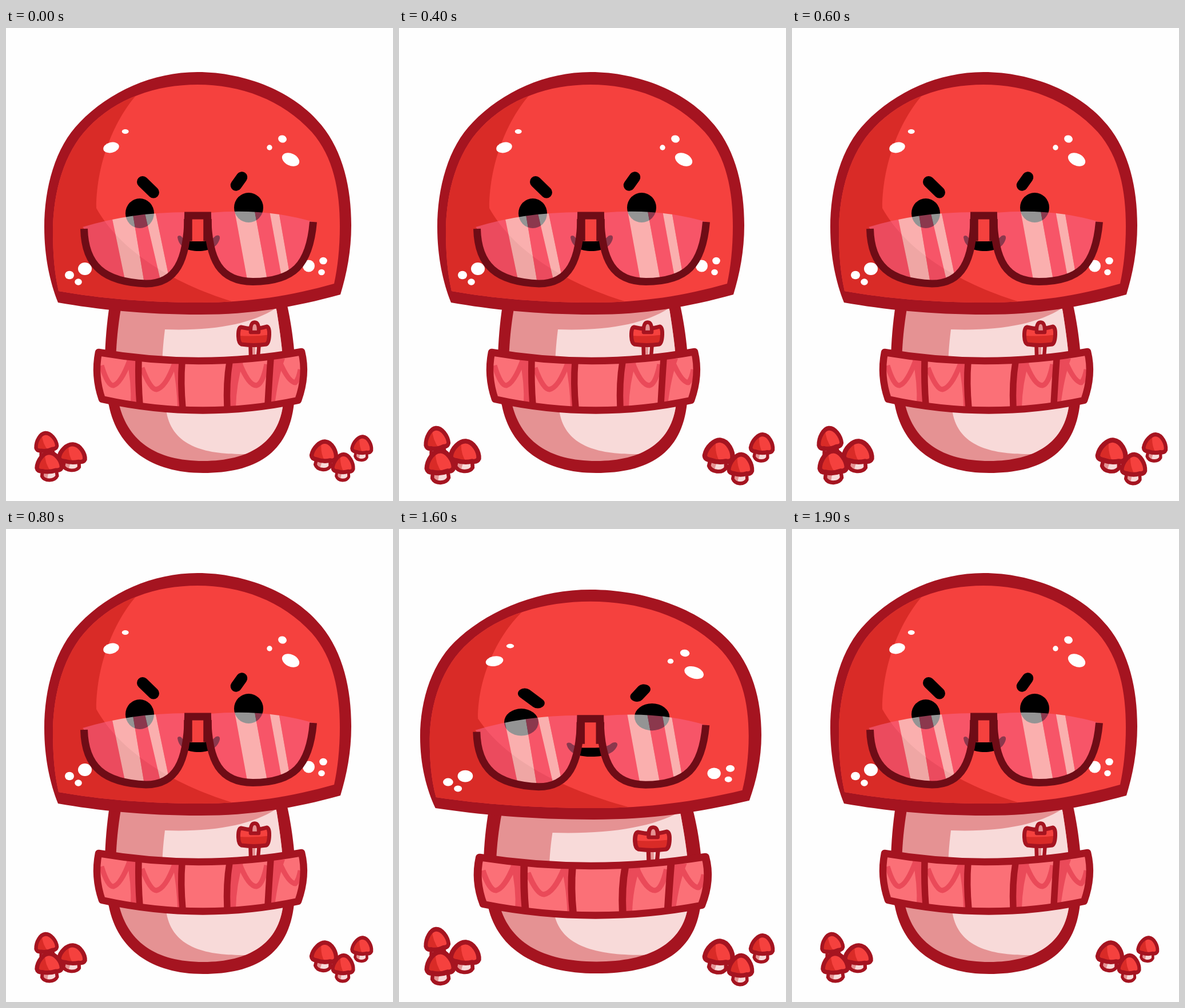
An HTML page with a canvas for the animation above (2.1 s loop, 677 by 827 pixels).

```html
<!DOCTYPE html>
<html lang="en">
<head>
<meta charset="utf-8">
<title>Bouncing mushroom</title>
<style>
html, body { margin: 0; width: 100%; height: 100%; overflow: hidden; background: #fefefe; }
canvas { display: block; }
</style>
</head>
<body>
<canvas id="stage" width="677" height="827"></canvas>
<script>
const ctx = document.getElementById('stage').getContext('2d');
const LINE = '#a51420', RED = '#f5413e', DARK = '#d92b27';
const LIGHT = '#f8dad9', SHADE = '#e59293', PINK = '#fb7077', FOLD = '#ea4a59';
const FRAME = '#6f0c16', LENS = 'rgba(250,101,138,.555)', GLARE = 'rgba(255,255,255,.58)';

// Each part: [scaleX, scaleY, moveX, moveY]
const still = [1, 1, 0, 0];
const poses = {
  rest: { cap: still, face: still, glasses: still, stem: still, scarf: still },
  tall: {
    cap: [.976, 1.042, 5.6, -32.3], face: [.947, 1.077, 17.9, -31],
    glasses: [1, 1, -.7, -8], stem: [.952, 1.035, 14.3, -27.2], scarf: [1, 1, -1, -1]
  },
  wide: {
    cap: [1.1117, .948, -37.5, 33], face: [1.2, .913, -66.8, 42],
    glasses: [1, 1, -.7, 3.7], stem: [1.147, .98, -50.4, 14.6], scarf: [1.1126, 1, -39.3, 7]
  }
};
const sprouts = {
  mid: { left: still, right: still },
  small: { left: [.863, .845, 10.6, 114.3], right: [.882, .938, 69.8, 46.1] },
  big: { left: [1.084, 1.155, -10, -118.3], right: [1.136, 1.123, -72.4, -91.6] }
};

const LOOP = 2100, STEP = 100;
const hop = ['tall', 'rest', 'wide', 'rest', 'tall'];
const hops = [
  { start: 300, sizes: ['mid', 'big', 'small', 'big', 'mid'] },
  { start: 1400, sizes: ['mid', 'small', 'big', 'small', 'mid'] }
];

const P = d => new Path2D(d);

function fill(path, color) {
  ctx.fillStyle = color;
  ctx.fill(path);
}

function stroke(path, color, width) {
  ctx.strokeStyle = color;
  ctx.lineWidth = width;
  ctx.stroke(path);
}

function group(draw, [sx, sy, x, y]) {
  ctx.save();
  ctx.transform(sx, 0, 0, sy, x, y);
  draw();
  ctx.restore();
}

function clipped(path, draw) {
  ctx.save();
  ctx.clip(path);
  draw();
  ctx.restore();
}

function spot(x, y, rx, ry, turn = 0, color = '#fff') {
  ctx.beginPath();
  ctx.ellipse(x, y, rx, ry, turn, 0, 7);
  ctx.fillStyle = color;
  ctx.fill();
}

const stemOuter = P('M181 485C172 545 169 620 180 660C195 735 255 778 345 778C435 778 495 745 504 655C511 600 502 530 492 485Z');
const stemInner = P('M202 485C193 535 188 600 196 650C210 722 262 757 345 757C425 757 478 725 485 655C490 600 480 535 472 485Z');
const stemLight = P('M278 527C365 530 430 517 472 490L500 560V745H420C350 746 292 732 281 673C272 640 270 590 278 527Z');

function drawStem() {
  fill(stemOuter, LINE);
  fill(stemInner, SHADE);
  clipped(stemInner, () => fill(stemLight, LIGHT));
}

const badge = P('M411 523Q434 529 456 522Q461 523 460.5 536Q460 551 455 553Q434 556 412 553Q407 551 406.5 539Q406 524 411 523Z');

function drawBadge() {
  fill(P('M427 556H443V576H427Z'), LIGHT);
  fill(P('M427 556H436V576H427Z'), SHADE);
  stroke(P('M427.5 556L428 574M442.5 556L441 574'), LINE, 6.5);
  fill(badge, RED);
  clipped(badge, () => fill(P('M400 537Q434 541 468 535V562H400Z'), DARK));
  stroke(badge, LINE, 7);
  const knob = P('M428 532Q427 514.5 435 514.5Q443 514.5 442 532Z');
  fill(knob, SHADE);
  stroke(knob, LINE, 6.5);
}

const scarf = P('M162 567Q340 597.5 517 566C523 590 522 620 511 651Q340 687 168 649C158 620 157 592 162 567Z');
const scallops = P('M167 590Q178 626 188 625Q201 621 216 582M238 594Q252 632 263 632Q279 629 295 586M408 584Q424 625 438 625Q449 623 456 588M478 582Q494 619 506 620Q512 614 515 597');
const pleats = P('M211 580H232V660H218Q220 620 211 580ZM291 584H308V664H300Q299 625 291 584ZM391 584H415Q403 620 402 664H387ZM463 578H488Q476 610 470 660H458Z');
const seams = P('M232 580Q231 620 234 658M308 584Q305 620 309 664M391 584Q385 620 387 664M463 578Q460 620 458 658');

function drawScarf() {
  fill(scarf, PINK);
  clipped(scarf, () => {
    fill(pleats, FOLD);
    stroke(scallops, FOLD, 9);
  });
  stroke(seams, LINE, 11.5);
  stroke(scarf, LINE, 12.5);
}

const capOuter = P('M91 480C77 445 67 400 67 348C67 280 86 208 129 165C181 111 257 77 335 77C420 77 505 112 552 170C590 217 604 280 604 345C604 390 596 430 585 466C505 488 430 501 340 501C240 501 160 492 91 480Z');
const capInner = P('M92 460C84 425 82 390 82 352C83 287 101 218 144 174C192 123 263 99 335 99C410 99 483 125 535 182C573 225 584 285 584 347C584 385 580 420 574 447C500 468 425 480 340 480C250 480 165 473 92 460Z');
const capShade = P('M235 110C195 150 158 230 158 315C200 390 290 445 395 478V490H60V110Z');

function drawCap() {
  fill(capOuter, LINE);
  fill(capInner, RED);
  clipped(capInner, () => fill(capShade, DARK));
  spot(184, 209, 14, 9, -.25);
  spot(208.7, 181, 6, 4);
  spot(483.5, 194, 7.5, 6.5, .3);
  spot(461, 209, 4.7, 4.7);
  spot(498, 230, 16, 10.5, .45);
  spot(111, 432, 8, 7.3);
  spot(126.5, 444, 6.3, 5.8);
  spot(138, 421, 12, 11);
  spot(529.5, 416, 10.5, 10.5);
  spot(555, 407, 6.8, 6.3);
  spot(552, 427, 5.8, 5.3);
}

function drawFace() {
  spot(234, 324, 25, 26, 0, '#000');
  spot(424.5, 314, 25.5, 26, 0, '#000');
  ctx.lineCap = 'round';
  stroke(P('M239 269L258 287.5'), '#000', 20);
  stroke(P('M412.5 261L402.5 275'), '#000', 19.5);
  ctx.lineCap = 'butt';
  fill(P('M300 366C300 362 306 362 308 366C318 374 325 373 337 373C350 373 358 372 365 365C369 361 375 362 374 368C370 384 355 390 337 390C318 390 303 384 300 366Z'), '#000');
}

const leftLens = P('M134 348Q220 322 316 322L318 330C318 385 312 418 292 436Q275 447 245 447C175 444 138 424 136 350Z');
const rightLens = P('M357 323Q455 314 541 340C536 385 525 420 500 434Q475 445 432 443C370 440 354 410 354 330Z');
const rims = P('M136.5 351C138 415 170 444 245 447C297 447 317 408 318.5 328H352.5C354 408 375 443 432 443.5C503 443 531 415 537.5 339');

// Edges run [xTop, xBottom] between y 320 and y 440, switching tint and glare.
function drawLens(lens, edges) {
  clipped(lens, () => {
    for (let i = 1; i < edges.length; i++) {
      const [a, b] = edges[i - 1], [c, d] = edges[i];
      fill(P(`M${a} 320L${b} 440L${b + (b - a) / 4} 470H${d + (d - c) / 4}L${d} 440L${c} 320L${c - (d - c) / 4} 290H${a - (b - a) / 4}Z`),
        i % 2 ? LENS : GLARE);
    }
  });
}

function drawGlasses() {
  drawLens(leftLens, [[100, 100], [183, 208], [221, 241], [242, 270], [261, 286], [340, 340]]);
  drawLens(rightLens, [[330, 330], [400, 422], [435, 457], [461, 483], [477, 498], [570, 570]]);
  ctx.lineJoin = 'miter';
  stroke(rims, FRAME, 13);
  stroke(P('M318.5 334V372M352.5 334V372'), FRAME, 14.5);
  ctx.lineJoin = 'round';
}

const sproutCap = P('M-22 9C-21 -4 -10 -17 0 -17C12 -17 22 -2 22 9Q20 15 12 14Q0 18 -12 15Q-21 15 -22 9Z');
const sproutFoot = P('M-12 12L-13.5 24Q-10 31 0 31Q10 31 13.5 24L12 12Z');

function sprout(x, y, sx, sy, turn) {
  ctx.save();
  ctx.translate(x, y);
  ctx.rotate(turn);
  ctx.scale(sx, sy);
  fill(sproutFoot, LIGHT);
  clipped(sproutFoot, () => fill(P('M-16 10H2Q-4 20 -4 32H-16Z'), SHADE));
  stroke(sproutFoot, LINE, 6);
  fill(sproutCap, RED);
  clipped(sproutCap, () => fill(P('M-7 -20Q-9 4 6 20H-30V-20Z'), DARK));
  stroke(sproutCap, LINE, 7.5);
  ctx.restore();
}

function drawLeftSprouts() {
  sprout(70, 724, .84, .93, -.1);
  sprout(116, 744, 1.03, .95, .08);
  sprout(75.5, 759.5, .99, 1, -.03);
}

function drawRightSprouts() {
  sprout(557, 740.5, .98, 1.02, .12);
  sprout(623, 729, .78, .86, .1);
  sprout(590, 761.5, .82, .94, .06);
}

function stateAt(time) {
  for (const { start, sizes } of hops) {
    const i = Math.floor((time - start) / STEP);
    if (i >= 0 && i < hop.length) return [poses[hop[i]], sprouts[sizes[i]]];
  }
  return [poses.rest, sprouts.mid];
}

function draw(time) {
  const [pose, size] = stateAt(time % LOOP);
  ctx.fillStyle = '#fefefe';
  ctx.fillRect(0, 0, 677, 827);
  ctx.lineJoin = 'round';
  group(drawStem, pose.stem);
  group(drawBadge, pose.scarf);
  group(drawScarf, pose.scarf);
  group(drawCap, pose.cap);
  group(drawFace, pose.face);
  group(drawGlasses, pose.glasses);
  group(drawLeftSprouts, size.left);
  group(drawRightSprouts, size.right);
}

const begin = performance.now();
function tick() {
  draw(performance.now() - begin);
  requestAnimationFrame(tick);
}
tick();
</script>
</body>
</html>
```
